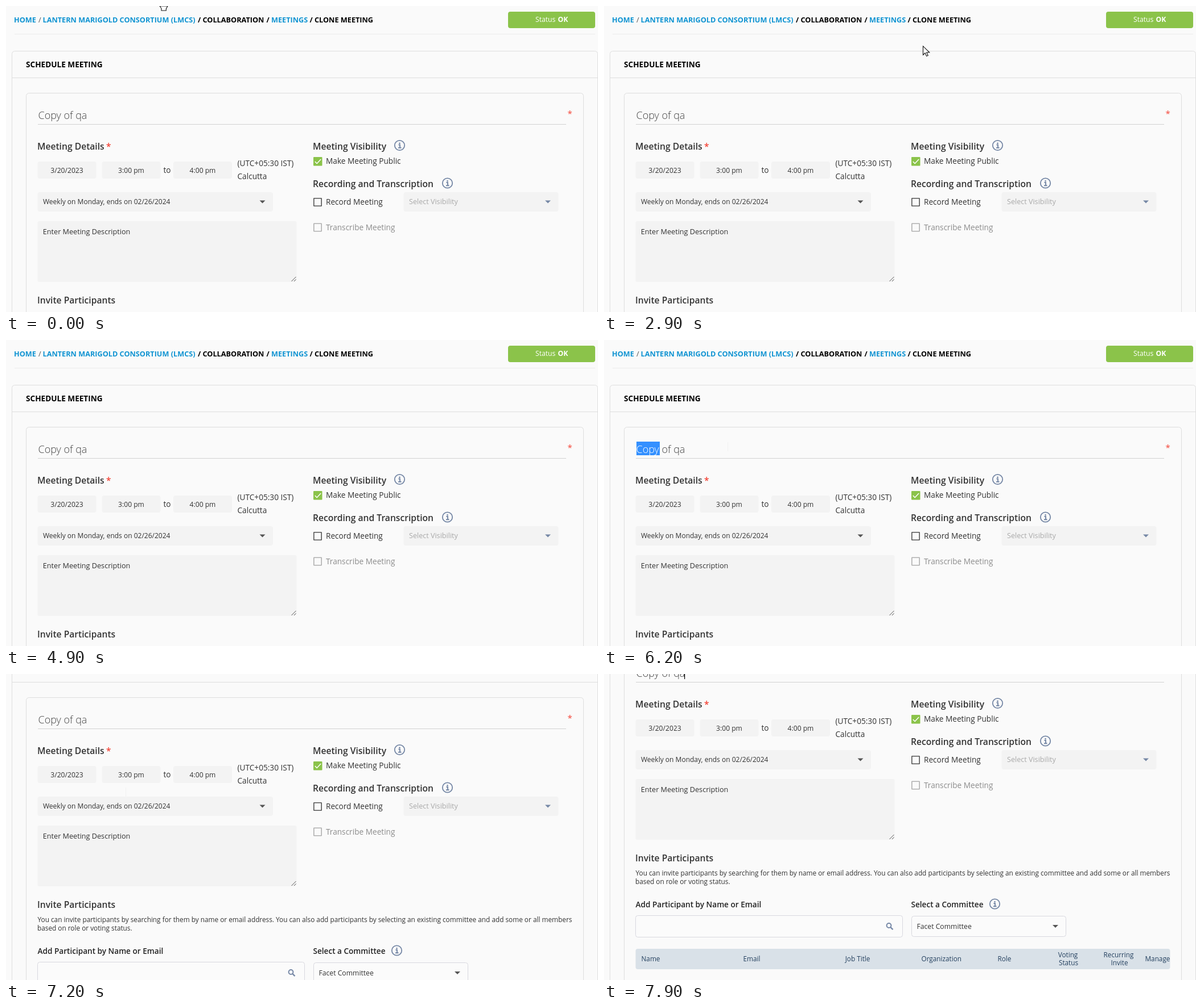
Animation, 1040 px wide and 539 px high, one loop 8000 ms. Source, as an HTML page:

```html
<!DOCTYPE html>
<html lang="en">
<head>
<meta charset="utf-8">
<title>Schedule meeting</title>
<style>
  html, body { margin: 0; width: 100%; height: 100%; overflow: hidden; background: #fafafa; }
  svg { display: block; width: 1040px; height: 539px; font-family: "Open Sans", sans-serif; }
  text { white-space: pre; }
</style>
</head>
<body>
<svg id="stage" viewBox="0 0 1040 539"></svg>
<script>
const LOOP = 8000;
const INK = '#333', BLUE = '#1094d2', GREEN = '#8bc34a', SLATE = '#7688a6', FIELD = '#f3f3f3', LINE = '#dedede';
const stage = document.getElementById('stage');

function el(parent, tag, attrs, content) {
  const node = document.createElementNS('http://www.w3.org/2000/svg', tag);
  for (const key in attrs) node.setAttribute(key, attrs[key]);
  if (content) node.textContent = content;
  return parent.appendChild(node);
}

const page = el(stage, 'g', {});

function text(x, y, size, content, fill = INK, weight = 400, anchor = 'start', parent = page) {
  return el(parent, 'text', { x, y, 'font-size': size, fill, 'font-weight': weight, 'text-anchor': anchor }, content);
}
function box(x, y, width, height, fill = FIELD, rx = 4, stroke = 'none', parent = page) {
  return el(parent, 'rect', { x, y, width, height, fill, rx, stroke });
}
function path(d, stroke, width = 1, fill = 'none', parent = page) {
  return el(parent, 'path', { d, stroke, 'stroke-width': width, fill });
}
const arrowDown = (x, y, fill) => path(`M${x} ${y}h10l-5 5z`, 'none', 0, fill);
const heading = (x, y, content) => text(x, y, 15.65, content, INK, 600);
const label = (y, content, fill = INK) => text(562, y, 13.65, content, fill);
function info(x, y) {
  el(page, 'circle', { cx: x, cy: y, r: 8.7, fill: 'none', stroke: SLATE, 'stroke-width': 1.8 });
  path(`M${x - 2} ${y - 1}h2.5v5M${x - 2.5} ${y + 4.3}h5.5`, SLATE, 1.9);
  box(x - 1.3, y - 5, 2.6, 2.4, SLATE, 1);
}
const checkbox = (y, stroke) => el(page, 'rect',
  { x: 540.8, y, width: 13.4, height: 13.4, fill: 'none', stroke, 'stroke-width': 1.6, rx: 0.5 });

// Breadcrumb and status
const crumb = (x, content, fill = '#000', weight = 700) => text(x, 29, 12.7, content, fill, weight);
crumb(14, 'HOME', BLUE);
crumb(57, '/', '#555', 400);
crumb(64.5, 'LANTERN MARIGOLD CONSORTIUM (LMCS)', BLUE);
crumb(337, '/');
crumb(345.5, 'COLLABORATION');
crumb(457.5, '/');
crumb(466, 'MEETINGS', BLUE);
crumb(533.5, '/');
crumb(542, 'CLONE MEETING');
path('M15 49.5H1035', '#ebebeb');
box(882, 10, 153, 29, GREEN);
text(930, 28, 12.2, 'Status', '#fff');
text(969.5, 28, 12.2, 'OK', '#fff', 700);

// Panels and title
box(10.5, 79.5, 1029, 900, 'none', 5, LINE);
path('M10 126.5H1040', LINE);
text(35, 108, 13.6, 'SCHEDULE MEETING', '#000', 700);
box(35.5, 153.5, 979, 900, 'none', 5, LINE);
text(56.5, 198.5, 18, 'Copy of qa', '#444', 300);
text(986.5, 194.5, 15, '*', '#f44336');
path('M56 208.5H984', '#d2d2d2');

// Date and description
heading(55, 252.5, 'Meeting Details');
text(176, 252.5, 15.5, '*', '#f44336', 600);
for (const [x, value] of [[55.5, '3/20/2023'], [168.5, '3:00 pm'], [294, '4:00 pm']]) {
  box(x, 274, 103, 30);
  text(x + 51.5, 294, 12.1, value, INK, 400, 'middle');
}
text(276.5, 294, 13.65, 'to');
text(406.5, 282, 13.65, '(UTC+05:30 IST)');
text(406.5, 305, 13.65, 'Calcutta');
box(55.5, 328, 413.5, 34);
text(65, 349, 12, 'Weekly on Monday, ends on 02/26/2024');
arrowDown(445.5, 342.5, '#555');
box(55.5, 379, 455, 107, FIELD, 3);
text(64.8, 402, 12.65, 'Enter Meeting Description');
path('M501.5 485l8-8M506 485l3.5-3.5', '#555');

// Visibility and recording
heading(539, 252.5, 'Meeting Visibility');
info(691.5, 245.5);
box(540, 266, 15.5, 15.5, GREEN, 1);
path('M542.8 274l3.4 3.5 6.9-7.6', '#fff', 1.5);
label(278, 'Make Meeting Public');
heading(539, 318.5, 'Recording and Transcription');
info(775.5, 312);
checkbox(338.8, '#555');
label(350, 'Record Meeting');
box(698.5, 328, 272, 34);
text(708, 349, 12.6, 'Select Visibility', '#a9a9a9');
arrowDown(947, 342.5, SLATE);
checkbox(383.3, '#b0b0b0');
label(395, 'Transcribe Meeting', '#8c8c8c');

// Participants
heading(55, 524, 'Invite Participants');
text(55.5, 549, 11.8, 'You can invite participants by searching for them by name or email address. You can also add participants by selecting an existing committee and add some or all members');
text(55, 564, 11.8, 'based on role or voting status.');
text(55.5, 605, 13.6, 'Add Participant by Name or Email', '#222', 600);
box(55.5, 619.5, 469, 38, '#fbfbfb', 4, '#d8d8df');
el(page, 'circle', { cx: 500.5, cy: 637, r: 3.9, fill: 'none', stroke: SLATE, 'stroke-width': 2 });
path('M503.3 640l4.2 4.2', SLATE, 2.4);
text(539.5, 605, 13.6, 'Select a Committee', '#222', 600);
info(686.5, 599);
box(540.5, 620.5, 271, 36, '#fbfbfb', 4, '#d8d8df');
text(549.5, 643, 12.2, 'Facet Committee');
arrowDown(788, 636, '#555');
box(55.5, 678, 939, 36, '#d9e1e8');
const column = (x, y, content, anchor) => text(x, y, 11.75, content, '#24405f', 400, anchor);
column(65.5, 700, 'Name');
column(244.5, 700, 'Email');
column(423.7, 700, 'Job Title');
column(557.5, 700, 'Organization');
column(691.5, 700, 'Role');
column(815, 693, 'Voting', 'middle');
column(816, 706.5, 'Status', 'middle');
column(904, 693, 'Recurring', 'middle');
column(905.5, 706.5, 'Invite', 'middle');
column(950.5, 700, 'Manage');

// Selected text is a white copy on blue, revealed by a clip.
function selection(id, x, y, height, drawText) {
  const clip = el(el(stage, 'clipPath', { id }), 'rect', { x, y, width: 0, height });
  const group = el(page, 'g', { 'clip-path': `url(#${id})` });
  box(x, y, 200, height, '#3390ff', 0, 'none', group);
  drawText(group);
  return width => clip.setAttribute('width', width);
}
const selectCrumb = selection('crumbClip', 542, 13, 23,
  g => text(542, 29, 12.7, 'CLONE MEETING', '#fff', 700, 'start', g));
const selectTitle = selection('titleClip', 57, 179, 24,
  g => text(56.5, 198.5, 18, 'Copy of qa', '#fff', 300, 'start', g));
const caret = box(0, 179, 1.2, 24, '#000', 0);

const pointers = {
  arrow: path('M.5 .7V16.2l3.6-3.4 2.5 5.6 2.6-1.1-2.5-5.5h5z', '#111', 1.1, '#fff', stage),
  hand: path('M.5 0l3 4.3v3.7h8.3v-3L14.5 0z', '#111', 1.1, '#fff', stage),
  beam: path('M.5 0V16', '#f1f1f1', 1, 'none', stage)
};

// Tables of [time, value...]; each row holds until the next one.
const pointerSteps = [
  [0, 'hand', 269.5, 0], [100],
  [300, 'arrow', 604, 3], [400, 'arrow', 586, 5], [500, 'arrow', 566, 8], [600, 'arrow', 550, 10], [700],
  [1800, 'arrow', 617, 10.5], [1900, 'arrow', 631, 10], [2000, 'arrow', 645, 9], [2100, 'arrow', 654, 8],
  [2200, 'arrow', 658, 8], [2500, 'arrow', 675, 23], [2700, 'arrow', 676, 23],
  [2900, 'arrow', 560, 70], [3000, 'arrow', 370, 140], [3100, 'arrow', 228, 190],
  [3300, 'arrow', 216, 172], [3400, 'arrow', 186, 140], [3500, 'arrow', 150, 118], [3600, 'arrow', 108, 112],
  [3700, 'arrow', 72, 112], [3800, 'arrow', 46, 114], [3900, 'arrow', 31, 114], [4000, 'arrow', 33, 111.5],
  [4100, 'arrow', 282, 52],
  [4300, 'arrow', 262, 90], [4400, 'arrow', 226, 150], [4500, 'arrow', 180, 215], [4600, 'arrow', 130, 231],
  [4700, 'arrow', 92, 214], [4800],
  [6000, 'arrow', 220, 176], [6200, 'beam', 217, 180], [6900, 'beam', 210, 200],
  [7500, 'beam', 158, 125], [7700, 'beam', 144, 112], [7800, 'beam', 130, 100], [7900, 'beam', 122, 91]
];
const crumbSteps = [[0, 0], [1500, 18], [1600, 38], [1800, 65], [1900, 80], [2000, 96], [2100, 103], [2900, 0]];
const titleSteps = [[0, 0], [5400, 41], [6600, 0]];
const caretSteps = [[0, -9], [5200, 68], [5400, -9], [6600, 141], [7000, -9], [7400, 141]];
const scrollSteps = [[0, 0], [7000, 2], [7100, 22], [7200, 112], [7300, 189], [7400, 193], [7500, 194]];

function at(steps, time) {
  let row = steps[0];
  for (const step of steps) if (step[0] <= time) row = step;
  return row.slice(1);
}

function draw(time) {
  const [kind, x, y] = at(pointerSteps, time);
  for (const name in pointers) pointers[name].setAttribute('visibility', name === kind ? 'visible' : 'hidden');
  if (kind) pointers[kind].setAttribute('transform', `translate(${x} ${y})`);
  selectCrumb(at(crumbSteps, time)[0]);
  selectTitle(at(titleSteps, time)[0]);
  caret.setAttribute('x', at(caretSteps, time)[0]);
  page.setAttribute('transform', `translate(0 ${-at(scrollSteps, time)[0]})`);
}

const start = performance.now();
function tick() {
  draw((performance.now() - start) % LOOP);
  requestAnimationFrame(tick);
}
tick();
</script>
</body>
</html>
```
